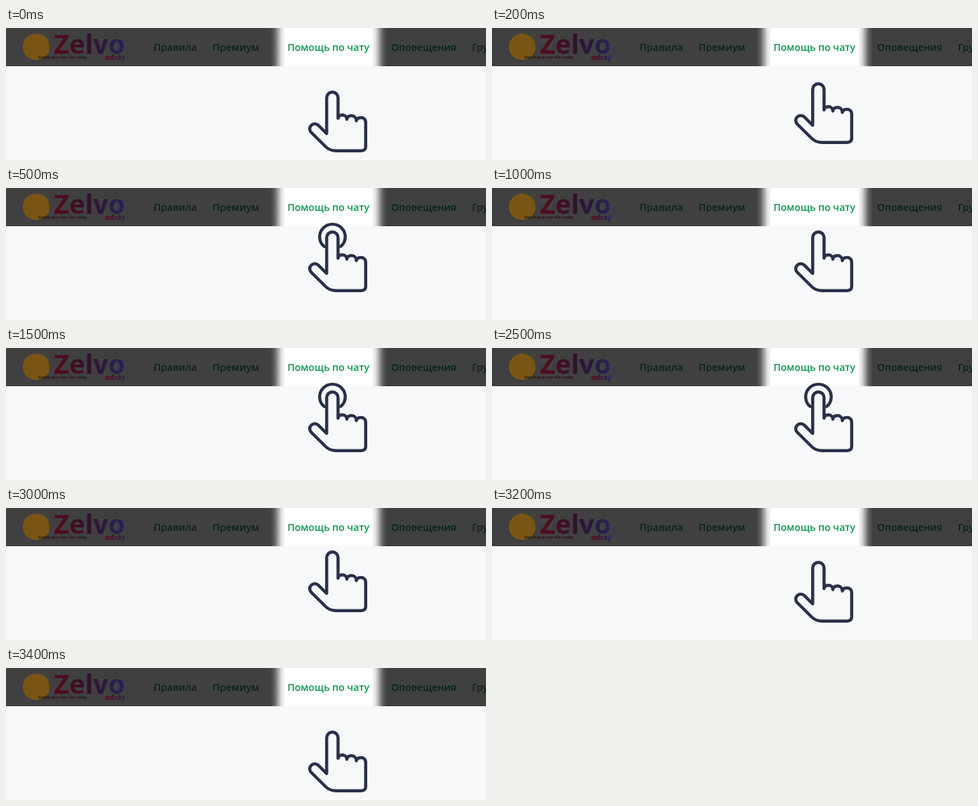
These frames come from a looping animation (683x190 px, 3500 ms). An HTML page:

```html
<!DOCTYPE html>
<html lang="ru">
<head>
<meta charset="utf-8">
<title>Подсказка</title>
<style>
html, body { margin: 0; width: 100%; height: 100%; overflow: hidden; background: #f7f8fa; }
svg { display: block; width: 683px; height: 190px; }
text { font-family: "Open Sans", "Noto Sans", sans-serif; }
.menu { font-size: 14px; font-weight: 600; fill: #0b9450; }
.line { fill: none; stroke: #293049; stroke-width: 4.4; stroke-linecap: round; stroke-linejoin: round; }
</style>
</head>
<body>
<svg viewBox="0 0 683 190">
  <defs>
    <linearGradient id="brand">
      <stop offset="0" stop-color="#570b15"/>
      <stop offset=".5" stop-color="#31112f"/>
      <stop offset="1" stop-color="#24245a"/>
    </linearGradient>
    <linearGradient id="shade" gradientUnits="userSpaceOnUse" x1="376" x2="542" y1="0" y2="0">
      <stop offset="0" stop-opacity=".75"/>
      <stop offset=".035" stop-opacity=".63"/>
      <stop offset=".095" stop-opacity=".13"/>
      <stop offset=".13" stop-opacity="0"/>
      <stop offset=".87" stop-opacity="0"/>
      <stop offset=".905" stop-opacity=".13"/>
      <stop offset=".965" stop-opacity=".63"/>
      <stop offset="1" stop-opacity=".75"/>
    </linearGradient>
  </defs>

  <rect width="683" height="190" fill="#f7f8fa"/>
  <rect width="683" height="55" fill="#fff"/>
  <g id="menu" class="menu"></g>
  <rect width="683" height="55" fill="url(#shade)"/>

  <circle cx="43" cy="27" r="19" fill="#795513"/>
  <g fill="url(#brand)" font-weight="700">
    <text x="68" y="37" font-size="38">Zelvo</text>
    <text x="141" y="46" font-size="10">ndray</text>
  </g>
  <text x="46" y="44" font-size="5" font-weight="700" fill="#2b0d10">Create your own chat today</text>

  <path id="ring" class="line" d="M452.7 84.2A18.2 18.2 0 1 1 476.3 84.2"/>
  <path id="hand" class="line" d="M456.3 123V71.3a8.1 8.1 0 0 1 16.2 0V101
    C473 98 475 96.3 478.5 96.3C482 96.3 485 98.5 485 102.5
    C485.5 99.2 488 97.3 491.5 97.3C495 97.3 498.5 99.8 498.5 104.5
    C499 101.7 501 100 505 100C508.5 100 511.8 102 511.8 107
    V141.5C511.8 146 509.5 147.8 505 147.8H470Q461 147.8 455 142
    L434.3 121.3A7.2 7.2 0 0 1 444.5 111.1Z"/>
</svg>
<script>
const LOOP = 3500, DROP = 29;
const $ = id => document.getElementById(id);
const items = [[210, "Правила"], [294, "Премиум"], [400.5, "Помощь по чату"], [548, "Оповещения"], [663, "Группы"]];

$("menu").innerHTML = items.map(([x, s]) => `<text x="${x}" y="33">${s}</text>`).join("");

// The hand rises in 100 ms steps, taps three times, then drops back.
function handOffset(t) {
  const step = Math.floor(t / 100);
  if (step < 5) return DROP * (1 - step / 5);
  if (step > 30) return DROP * Math.min(1, (step - 30) / 4);
  return 0;
}

function draw(t) {
  const tapping = t >= 500 && t < 3000 && Math.floor(t / 500) % 2 === 1;
  $("hand").setAttribute("transform", `translate(0 ${Math.round(handOffset(t))})`);
  $("ring").setAttribute("visibility", tapping ? "visible" : "hidden");
}

const start = performance.now();
function tick() {
  draw((performance.now() - start) % LOOP);
  requestAnimationFrame(tick);
}
draw(0);
requestAnimationFrame(tick);
</script>
</body>
</html>
```
